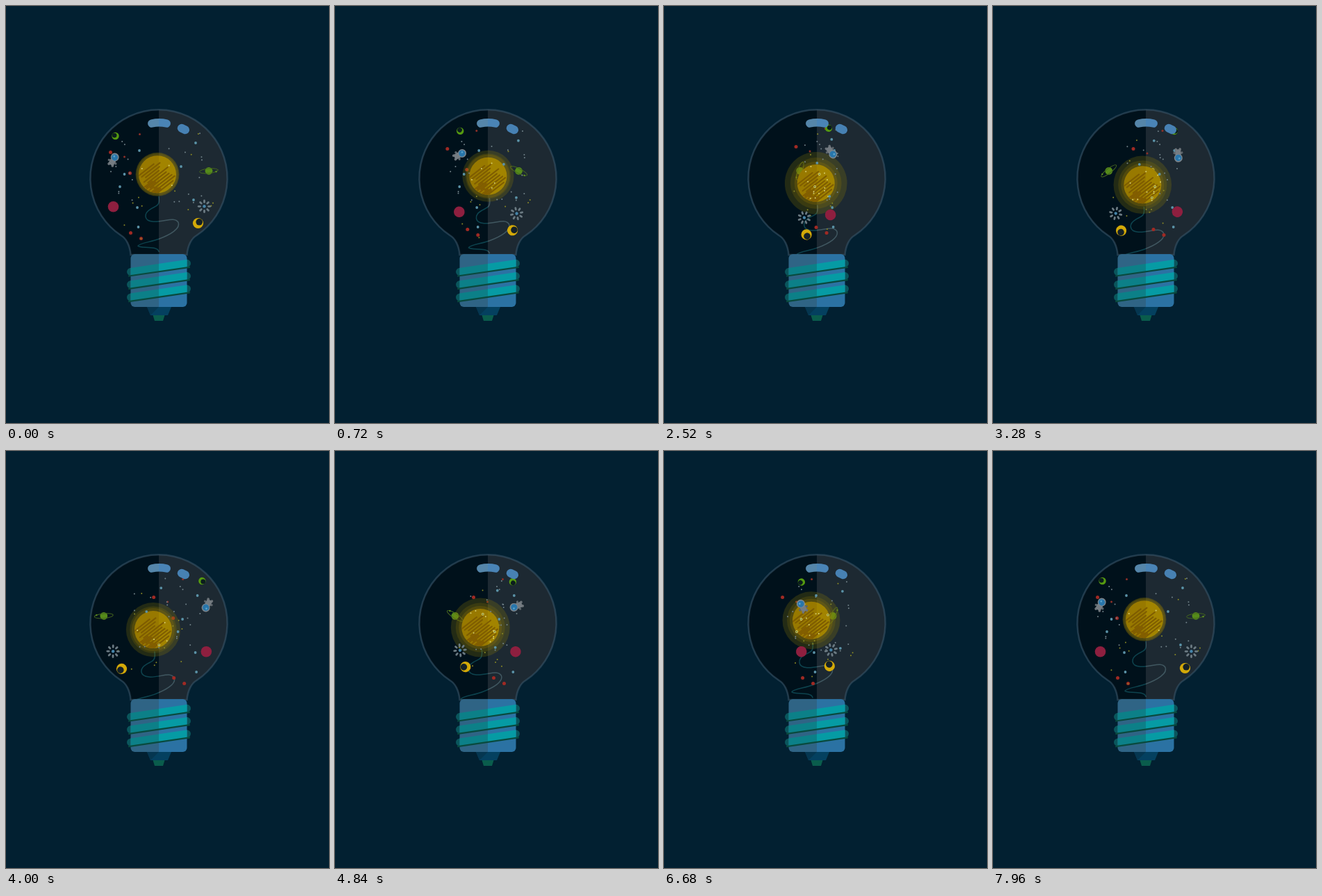
Recreate the animation shown at these times as an HTML page with a canvas. Size 465 by 600 pixels, loop 8 s.

```html
<!DOCTYPE html>
<html lang="en">
<head>
<meta charset="utf-8">
<title>Space in a light bulb</title>
<style>
html, body { margin: 0; width: 100%; height: 100%; overflow: hidden; background: #022031; }
canvas { display: block; }
</style>
</head>
<body>
<canvas id="stage" width="465" height="600"></canvas>
<script>
const c = document.getElementById('stage').getContext('2d');
const TAU = Math.PI * 2;
const AXIS = 220;
const SUN = 27;
const STILL = [0, 0];

const bulb = new Path2D('M179.5 358C178.5 345 173 334 165.5 330A98.6 98.6 0 1 1 274.5 330C267 334 261.5 345 260.5 358Z');
const tail = new Path2D('M2 32C4 46 -2 45 -10 50C-20 56 -20 67 -6 68C10 69 24 60 30 69C34 78 18 87 2 93C-8 97 -27 99 -28 103C-25 107 0 102 2 111');
const base = new Path2D();
base.roundRect(179.5, 357, 81, 76, 6);

let seed = 11;
const random = () => (seed = seed * 16807 % 2147483647) / 2147483647;

const scatter = (count, left, top, width, height) =>
  Array.from({ length: count }, () => [left + random() * width, top + random() * height]);

const redStars = [
  { color: '#a02a24', r: 2.5, shift: [62.5, 0], out: [0, -8.5], back: STILL,
    points: [[150.5, 210.5], [178.5, 240.5], [179.5, 326.5], [194.5, 334.5]] },
  { color: '#8e3028', r: 1.5, shift: [62.5, 0], out: [0, -8.5], back: STILL,
    points: [[170.5, 217], [192.5, 184.5]] }
];
const stars = [
  { color: '#72838a', r: 1, shift: [84, 0], out: STILL, back: STILL, points: scatter(11, 151, 190, 52, 108) },
  { color: '#72838a', r: 1, shift: [-50, 0], out: [0, -5.5], back: [0, 5.5], points: scatter(13, 234, 181, 50, 126) },
  { color: '#8a8a26', r: 1, shift: [-82, 21], out: [-4, -14], back: STILL, points: scatter(6, 243, 181, 55, 128) },
  { color: '#8a8a26', r: 1, shift: [58, -32], out: [4, 7], back: STILL, points: scatter(5, 150, 230, 48, 105) },
  { color: '#5b93a8', r: 1.9, shift: [84, 0], out: STILL, back: STILL,
    points: [[192, 208], [170.5, 242], [164, 260], [189, 290], [190.5, 318]] },
  { color: '#5b93a8', r: 1.9, shift: [-50, 0], out: [0, -5.5], back: [0, 5.5],
    points: [[273, 197], [252, 231], [270, 279]] }
];

function disc(x, y, r, color) {
  c.fillStyle = color;
  c.beginPath();
  c.arc(x, y, r, 0, TAU);
  c.fill();
}

function line(x1, y1, x2, y2, width, color) {
  c.lineWidth = width;
  c.strokeStyle = color;
  c.lineCap = 'round';
  c.beginPath();
  c.moveTo(x1, y1);
  c.lineTo(x2, y2);
  c.stroke();
}

function poly(points, color) {
  c.fillStyle = color;
  c.beginPath();
  points.forEach(p => c.lineTo(...p));
  c.fill();
}

// Paint that changes tone sharply at the given x
function twoTone(left, right, x = AXIS) {
  const paint = c.createLinearGradient(x - .1, 0, x + .1, 0);
  paint.addColorStop(0, left);
  paint.addColorStop(1, right);
  return paint;
}

// Offset out along one arc and back along another at loop phase u
function travel(u, { shift, out, back }) {
  const p = 1 - Math.abs(1 - 2 * u);
  const arc = 4 * p * (1 - p);
  const bulge = u < .5 ? out : back;
  return [0, 1].map(i => shift[i] * p + bulge[i] * arc);
}

function spinning(u, x, y, draw, shift, out, back = STILL) {
  const [dx, dy] = travel(u, { shift, out, back });
  c.save();
  c.translate(x + dx, y + dy);
  c.rotate(u * TAU);
  draw();
  c.restore();
}

function saturn() {
  disc(0, 0, 5.4, '#558b1a');
  c.strokeStyle = '#45661f';
  c.lineWidth = 1;
  c.beginPath();
  c.ellipse(0, 0, 13.5, 3.4, -.1, 0, TAU);
  c.stroke();
  disc(10.5, 1, 1.2, '#5d8f20');
}

function redPlanet() {
  disc(0, 0, 7.8, '#8e1f3f');
}

function greenMoon() {
  disc(0, 0, 5.2, '#559a10');
  disc(-1.4, -.9, 3.4, '#0b1d1d');
}

function yellowMoon() {
  disc(0, 0, 7.6, '#d3a908');
  disc(1.7, -1.7, 4.8, '#152127');
}

function flower() {
  for (let a = 0; a < TAU - .1; a += TAU / 8) {
    const x = Math.cos(a), y = Math.sin(a);
    line(x * 6, y * 6, x * 8.3, y * 8.3, 2.8, '#6b7a82');
  }
  disc(0, 0, 2.2, '#4684a8');
}

function astronaut() {
  c.rotate(.5);
  for (const side of [-1, 1]) {
    line(side * 2, 2, side * 5.5, 3, 3.2, '#5d656b');
    line(side * 2, 5, side * 3, 8, 3.6, '#6c7379');
  }
  line(0, 1, 0, 4, 8, '#757c82');
  disc(0, -4.5, 6, '#7b858d');
  disc(0, -4.2, 4.6, '#2876ab');
  disc(-1.4, -5.2, 1.4, '#5aa2cb');
}

function sunAt(u) {
  return [
    215 + 6.2 * Math.cos(TAU * (u - .17)),
    249.7 - 7.8 * Math.cos(TAU * (u + .05))
  ];
}

// The glow swells, half relaxes, swells again and shrinks back
function glowRadius(u) {
  const v = 4 * Math.min(u, 1 - u);
  return v < 1 ? 31.5 + 15.5 * v : 47 - 8 * (v - 1);
}

function drawTail(x, y) {
  c.save();
  c.clip(bulb);
  c.translate(x, y);
  c.lineWidth = 1.5;
  c.strokeStyle = twoTone('#0d434e', '#405760', AXIS - x);
  c.stroke(tail);
  c.restore();
}

function drawSun(x, y, r) {
  disc(x, y, r, 'rgba(150,130,0,.23)');
  disc(x, y, SUN + (r - SUN) * .55, 'rgba(150,125,0,.2)');
  disc(x, y, 31, 'rgba(150,120,0,.25)');
  disc(x, y, SUN, twoTone('#987900', '#a28400'));
  c.save();
  c.beginPath();
  c.arc(x, y, SUN, 0, TAU);
  c.clip();
  c.translate(x, y);
  c.rotate(-.66);
  for (let i = 0; i < 10; i++) {
    const v = 4 * i - 15;
    const end = i < 4 ? 5 + i * 5 % 3 * 4 : 18 - i * 3 % 4 * 2;
    line(i * 7 % 5 * 2 - 24, v, end, v, 2.1, '#7f5d00');
    if (i > 3) line(-26, v + 2, i % 3 * 3 - 15, v + 2, 2, '#835c00');
  }
  c.restore();
}

function drawStars(u, clouds, sx, sy) {
  for (const cloud of clouds) {
    const [dx, dy] = travel(u, cloud);
    for (const [px, py] of cloud.points) {
      const x = px + dx, y = py + dy;
      const lit = Math.hypot(x - sx, y - sy) < SUN;
      disc(x, y, cloud.r, lit ? '#d8d070' : cloud.color);
      if (lit) disc(x, y, cloud.r - .9, '#6f7f30');
    }
  }
}

function drawBase() {
  const threads = draw => [0, 18.3, 36.6].forEach(draw);
  threads(y => line(179.5, 382.5 + y, 260.5, 370.3 + y, 11, '#0a565c'));
  c.fillStyle = twoTone('#2f6485', '#2b72a3');
  c.fill(base);
  c.save();
  c.clip(base);
  threads(y => line(170, 383.9 + y, 270, 368.9 + y, 11, twoTone('#0c8088', '#069ba4')));
  c.restore();
  threads(y => line(177, 388.5 + y, 264, 375.8 + y, 2.2, '#094a3e'));
  poly([[203, 433], [238, 433], [233, 445], [208, 445]], '#04405f');
  poly([[203, 433], [220, 433], [208, 445]], '#053650');
  poly([[211.5, 445], [228.5, 445], [226, 453], [214, 453]], '#0a5c4c');
}

function drawHighlights() {
  c.lineWidth = 11.5;
  c.lineCap = 'round';
  c.strokeStyle = twoTone('#5586aa', '#4a84b6');
  c.stroke(new Path2D('M209.8 169Q220.5 166.5 231.2 169'));
  line(252.8, 175.8, 258, 178.2, 12, '#4781b3');
}

function draw(u) {
  const [sx, sy] = sunAt(u);
  c.fillStyle = '#022031';
  c.fillRect(0, 0, 465, 600);
  c.fillStyle = twoTone('#00111b', '#1d2932');
  c.fill(bulb);

  spinning(u, 292, 237.3, saturn, [-152, 0], STILL);
  drawTail(sx, sy);
  drawStars(u, redStars, sx, sy);
  drawSun(sx, sy, glowRadius(u));
  drawStars(u, stars, sx, sy);
  spinning(u, 154.5, 288.7, redPlanet, [134.5, 0], [0, 12.7]);
  spinning(u, 157.5, 187, greenMoon, [125.5, 0], [0, -12], [0, 1.8]);
  spinning(u, 285.5, 288.3, flower, [-132, 0], [0, 17.5], [-3, -2.3]);
  spinning(u, 276.5, 312.5, yellowMoon, [-110.5, 1], [-1.5, 17], [-3, -4]);
  spinning(u, 154.5, 221.5, astronaut, [136, 0], [0, -12.5], [1, 2.5]);

  c.lineWidth = 2.5;
  c.strokeStyle = 'rgba(60,88,108,.55)';
  c.stroke(bulb);
  drawHighlights();
  drawBase();
}

function tick() {
  const step = Math.floor(performance.now() % 8000 / 40);
  draw(step / 199);
  requestAnimationFrame(tick);
}
tick();
</script>
</body>
</html>
```
